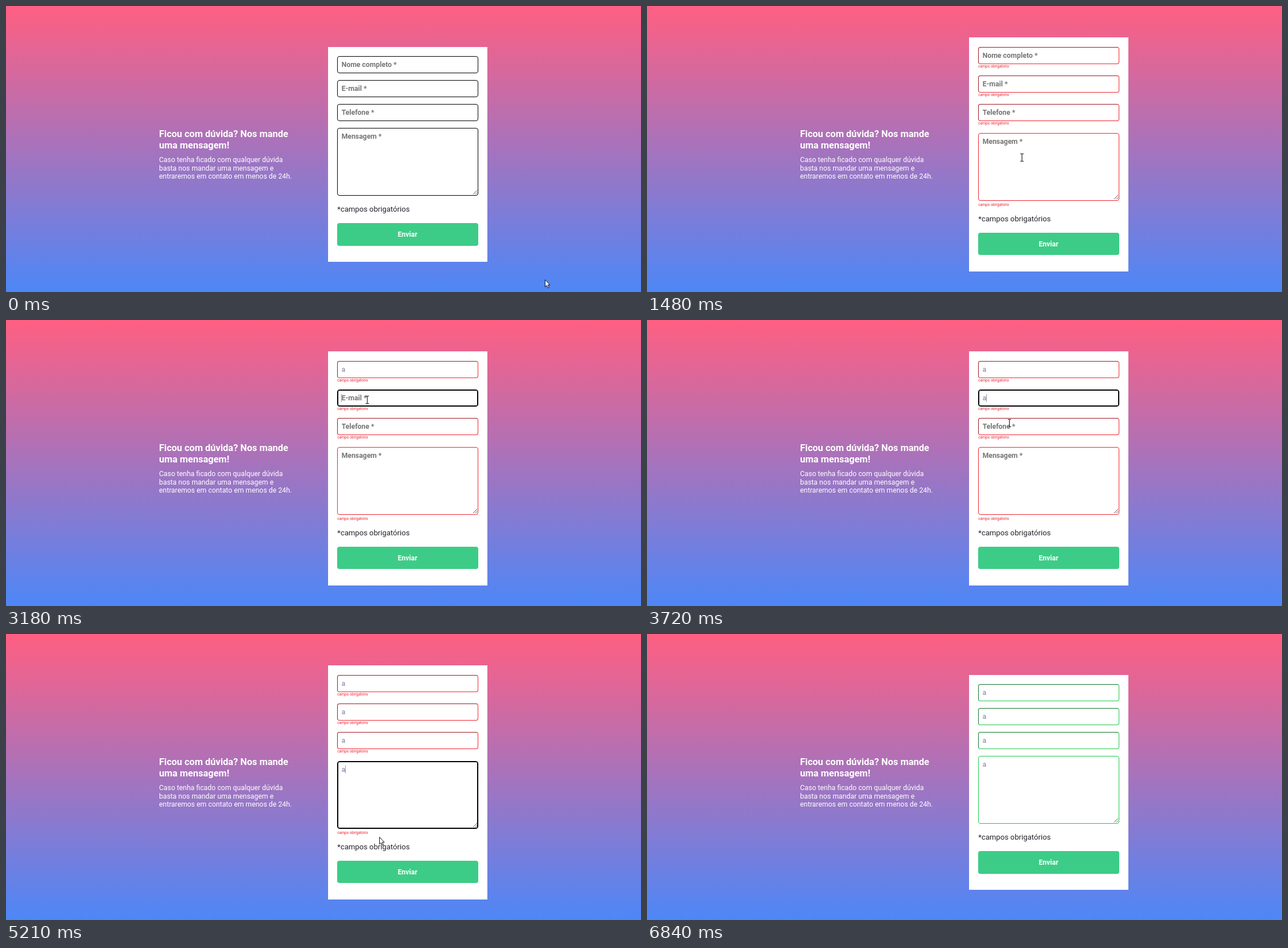
An HTML page that plays this animation: 1116x502 px, repeating every 6.91 s.

```html
<!DOCTYPE html>
<html lang="pt-BR">
<head>
<meta charset="utf-8">
<title>Formulário de contato</title>
<style>
  html, body { margin: 0; width: 100%; height: 100%; overflow: hidden; }
  body { position: relative; background: linear-gradient(#ff5f82, #4d87f7); }
  div, svg { position: absolute; box-sizing: border-box; }
  svg { left: 0; top: 0; width: 1116px; height: 502px; }
  text { font: 12.375px Roboto, sans-serif; white-space: pre; }
  .bold { font-weight: 700; }
  .title { font-size: 16.5px; font-weight: 700; }
  .note { font-size: 13.2px; fill: #25222c; }
  .error { font-size: 6.6px; fill: #ee2231; }
  #card { left: 566px; width: 280px; background: #fff; }
  #button { left: 582px; width: 247.5px; height: 39.5px; border-radius: 4px; background: #3dcc87; }
  .field { left: 582px; width: 247.5px; height: 30px; border: 1px solid #000; border-radius: 4px; }
  .field.area { height: 119px; }
  .bad { border-color: #f02530; }
  .good { border-color: #20c94a; }
  .bad:not(.area), .good:not(.area) { border-style: inset; }
  .focus { border: 1px solid #000 !important; box-shadow: inset 0 0 0 1px #000; }
</style>
</head>
<body>
<div id="card"></div>
<div id="button"></div>
<svg id="art" viewBox="0 0 1116 502">
  <g fill="#fff">
    <text class="title" x="269" y="230">Ficou com dúvida? Nos mande</text>
    <text class="title" x="269" y="249.8">uma mensagem!</text>
    <text x="269" y="273.7">Caso tenha ficado com qualquer dúvida</text>
    <text x="269" y="288.6">basta nos mandar uma mensagem e</text>
    <text x="269" y="303.4">entraremos em contato em menos de 24h.</text>
    <text class="bold" id="send" x="705.7" text-anchor="middle">Enviar</text>
  </g>
  <text class="note" id="note" x="582.3">*campos obrigatórios</text>
  <path id="grip" d="M821 116.500l7-7M825 116.500l3-3" stroke="#555" fill="none"/>
  <path id="caret" d="M0 0v14" stroke="#9a94aa"/>
  <g id="pointer" stroke-linejoin="round">
    <circle id="press" cx="-.5" r="10" fill="#f0c828" fill-opacity=".55"/>
    <path id="arrow" d="M.5.500V13L3.300 10.400 5.400 15 7.400 14.100 5.400 9.600H9Z" fill="#fff" stroke="#111"/>
    <path id="hand" d="M-1.500 10V1.500Q0-.5 1.500 1.500V6.200Q3 5 4.200 6.600 5.700 5.600 6.800 7.400 9 7 9 9V13L7 17.500H0L-5 11.500Q-5 9-1.500 10Z" fill="#fff" stroke="#111"/>
    <path id="beam" d="M-3-6.500H3M-3 6.500H3M0-6.500V6.500" fill="none" stroke="#222" stroke-width="1.2"/>
  </g>
</svg>
<script>
const LOOP = 6910, STEP = 67.3;
const $ = id => document.getElementById(id);
const art = $("art");

const path = [ // time, x, y
  [0, 947, 480], [540, 681, 400], [1290, 681, 400], [1750, 628, 77],
  [1950, 628, 77], [2230, 628, 85], [2860, 628, 85], [3100, 635, 140],
  [3340, 635, 140], [3780, 637, 190], [4180, 637, 190], [4320, 638, 250],
  [4460, 640, 262], [4880, 640, 262], [5210, 657, 365], [5550, 690, 408],
  [6570, 690, 408], [6770, 935, 496], [LOOP, 945, 520]
];
const presses = [[740, 940], [1890, 1950], [3110, 3180], [3920, 3980], [4670, 4730], [5820, 5950]];
const focusAt = [1890, 3110, 3920, 4670], blurAt = 5820;
const typedAt = [2510, 3310, 4190, 4890];
const errorFrom = 940, errorTo = 5950;

function addText(cls, x) {
  const el = document.createElementNS("http://www.w3.org/2000/svg", "text");
  el.setAttribute("class", cls);
  el.setAttribute("x", x);
  return art.insertBefore(el, $("grip"));
}

const fields = ["Nome completo *", "E-mail *", "Telefone *", "Mensagem *"].map((label, i) => {
  const box = document.createElement("div");
  document.body.insertBefore(box, art);
  const error = addText("error", 582.3);
  error.textContent = "campo obrigatório";
  return { label, box, error, area: i === 3, text: addText("bold", 589.7) };
});

const show = (el, on) => el.setAttribute("visibility", on ? "visible" : "hidden");
const move = (el, x, y) => el.setAttribute("transform", `translate(${x} ${y})`);

function pointerAt(t) {
  const q = Math.floor((t + 5) / STEP) * STEP;
  const i = Math.max(1, path.findIndex(p => p[0] > q));
  const [a, b] = [path[i - 1], path[i]];
  const k = (q - a[0]) / (b[0] - a[0]);
  return [1, 2].map(n => Math.round(a[n] + (b[n] - a[n]) * k));
}

function draw(t) {
  const bad = t >= errorFrom && t < errorTo, good = t >= errorTo;
  const tops = bad ? [71.5, 122, 172, 222.5] : [88, 130, 172, 214];
  const buttonTop = bad ? 397.5 : 381;
  const focus = t < blurAt ? focusAt.filter(f => t >= f).length - 1 : -1;

  $("card").style.top = (bad ? 55 : 71.5) + "px";
  $("card").style.height = (bad ? 410.5 : 377.5) + "px";
  $("button").style.top = buttonTop + "px";
  $("send").setAttribute("y", buttonTop + 24);
  $("note").setAttribute("y", buttonTop - 20);
  move($("grip"), 0, tops[3]);

  fields.forEach((f, i) => {
    const typed = t >= typedAt[i];
    f.box.className = ["field", f.area && "area", bad && "bad", good && "good", i === focus && "focus"]
      .filter(Boolean).join(" ");
    f.box.style.top = tops[i] + "px";
    f.text.textContent = typed ? "a" : f.label;
    f.text.setAttribute("fill", typed ? "#a59fb8" : "#757575");
    f.text.setAttribute("y", tops[i] + 19.2);
    f.error.setAttribute("y", tops[i] + (f.area ? 128.5 : 36.2));
    show(f.error, bad);
  });

  show($("caret"), focus >= 0);
  if (focus >= 0) move($("caret"), t >= typedAt[focus] ? 596.5 : 589.5, tops[focus] + 8);

  const [x, y] = pointerAt(t);
  const visible = t < 6840;
  const within = (top, h) => x >= 582 && x < 830 && y >= top && y < top + h;
  const onButton = within(buttonTop, 39);
  const onField = fields.some((f, i) => within(tops[i], f.area ? 119 : 30));
  move($("pointer"), x, y);
  show($("press"), presses.some(([a, b]) => t >= a && t < b));
  show($("hand"), visible && onButton);
  show($("beam"), visible && onField);
  show($("arrow"), visible && !onButton && !onField);
}

const start = performance.now();
function tick() {
  draw((performance.now() - start) % LOOP);
  requestAnimationFrame(tick);
}
tick();
</script>
</body>
</html>
```
